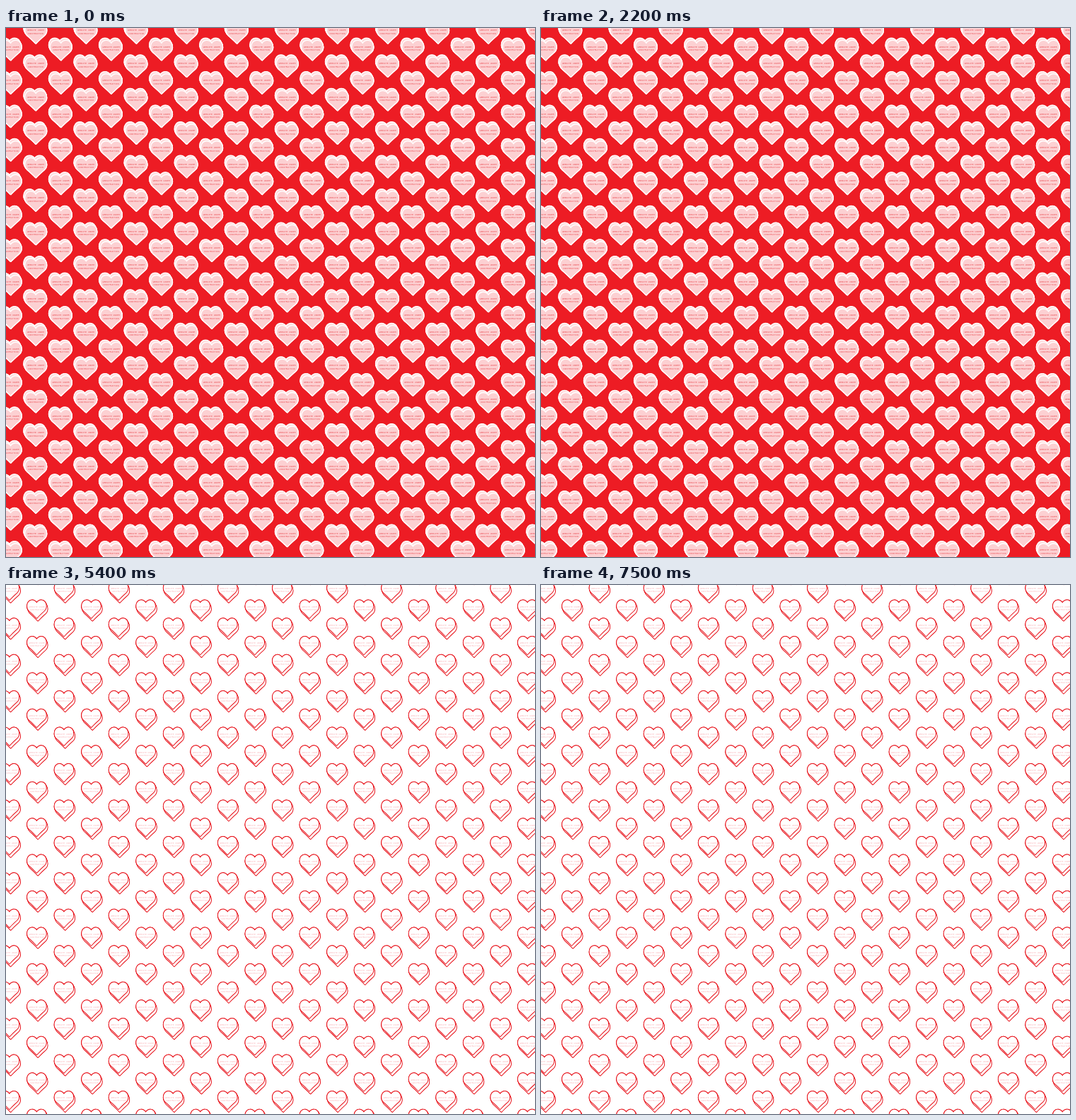
Animation, 748 px wide and 748 px high, one loop 8.4 s. Source, as an HTML page with a canvas:

```html
<!DOCTYPE html>
<html lang="en">
<head>
<meta charset="utf-8">
<title>Candy hearts</title>
<style>
html, body { margin: 0; width: 100%; height: 100%; overflow: hidden; background: #fff; }
canvas { position: absolute; left: 0; top: 0; width: 748px; height: 748px; }
</style>
</head>
<body>
<canvas id="stage" width="748" height="748"></canvas>
<script>
const SIZE = 748, LOOP = 8400;
const SWITCHES = [1200, 2200, 3300, 4300, 5400, 6400, 7500];
const RED = '#ed1c24';

// Heart outline: x is the centre, y the top edge
function heart(g, x, y, w, h) {
  const r = w / 2;
  const curve = (a, b, c, d, e, f) =>
    g.bezierCurveTo(x + a * r, y + b * h, x + c * r, y + d * h, x + e * r, y + f * h);
  g.beginPath();
  g.moveTo(x, y + 0.16 * h);
  curve(0.13, 0.05, 0.3, 0, 0.49, 0);
  curve(0.79, 0, 1, 0.14, 1, 0.34);
  curve(1, 0.45, 0.92, 0.53, 0.78, 0.6);
  curve(0.53, 0.72, 0.24, 0.86, 0, 1);
  curve(-0.24, 0.86, -0.53, 0.72, -0.78, 0.6);
  curve(-0.92, 0.53, -1, 0.45, -1, 0.34);
  curve(-1, 0.14, -0.79, 0, -0.49, 0);
  curve(-0.3, 0, -0.13, 0.05, 0, 0.16);
  g.closePath();
}

function label(g, x, y, size, gap, color) {
  g.save();
  g.translate(x, y);
  g.scale(size / 40, size / 40);
  g.font = '40px "Liberation Mono", monospace';
  g.textAlign = 'center';
  g.fillStyle = color;
  g.fillText('WEBSITE UNDER', 0, 0);
  g.fillText('CONSTRUCTION', 0, gap * 40 / size);
  g.restore();
}

// Solid heart: the face at (x, y), its back shifted by (dx, dy)
function candy(g, x, y, { w, h, dx, dy, line, edge, side, face }) {
  const sweep = paint => {
    for (let s = 0; s <= 1; s += 0.125) {
      heart(g, x + dx * s, y + dy * s, w, h);
      paint();
    }
  };
  g.lineJoin = 'round';
  g.strokeStyle = edge;
  g.lineWidth = line * 2;
  g.fillStyle = side;
  sweep(() => g.stroke());
  sweep(() => g.fill());
  heart(g, x, y, w, h);
  g.stroke();
  g.fillStyle = face;
  g.fill();
}

const PINK = { w: 29.6, h: 26.8, dx: -1.8, dy: -3.2, line: 1.4, edge: '#fff', side: '#fddcdd', face: '#fcd0d2' };
const LINES = { w: 26.6, h: 25.2, dx: 1.8, dy: 3.8, line: 1, edge: '#e8161e', side: '#fff', face: '#fff' };

function pinkCandy(g, x, y) {
  candy(g, x + 0.9, y + 4.6, PINK);
  label(g, x + 0.7, y + 14.2, 3.1, 4.5, '#ea555b');
}

function lineCandy(g, x, y) {
  candy(g, x - 0.9, y + 1, LINES);
  label(g, x - 0.5, y + 11.4, 2.9, 4, '#f9b9bd');
}

// Staggered grid; even rows start at x0, odd rows at x1
function pattern(bg, draw, x0, x1, top, dx, dy) {
  const c = document.createElement('canvas');
  c.width = c.height = SIZE;
  const g = c.getContext('2d');
  g.fillStyle = bg;
  g.fillRect(0, 0, SIZE, SIZE);
  for (let row = -1; top + row * dy < SIZE; row++) {
    const start = row % 2 ? x1 : x0;
    for (let x = start - dx; x < SIZE + dx; x += dx) draw(g, x, top + row * dy);
  }
  return c;
}

const scenes = [
  pattern(RED, pinkCandy, 41.3, 5.75, -10.2, 71.1, 23.72),
  pattern('#fff', lineCandy, 5.75, 44.3, -5.2, 77.1, 25.72)
];
const ctx = document.getElementById('stage').getContext('2d');
const origin = performance.now();
let shown = -1;

function frame(now) {
  const t = Math.max(0, now - origin) % LOOP;
  const scene = SWITCHES.filter(s => t >= s).length % 2;
  if (scene !== shown) {
    ctx.drawImage(scenes[scene], 0, 0);
    shown = scene;
  }
  requestAnimationFrame(frame);
}
frame(origin);
</script>
</body>
</html>
```
